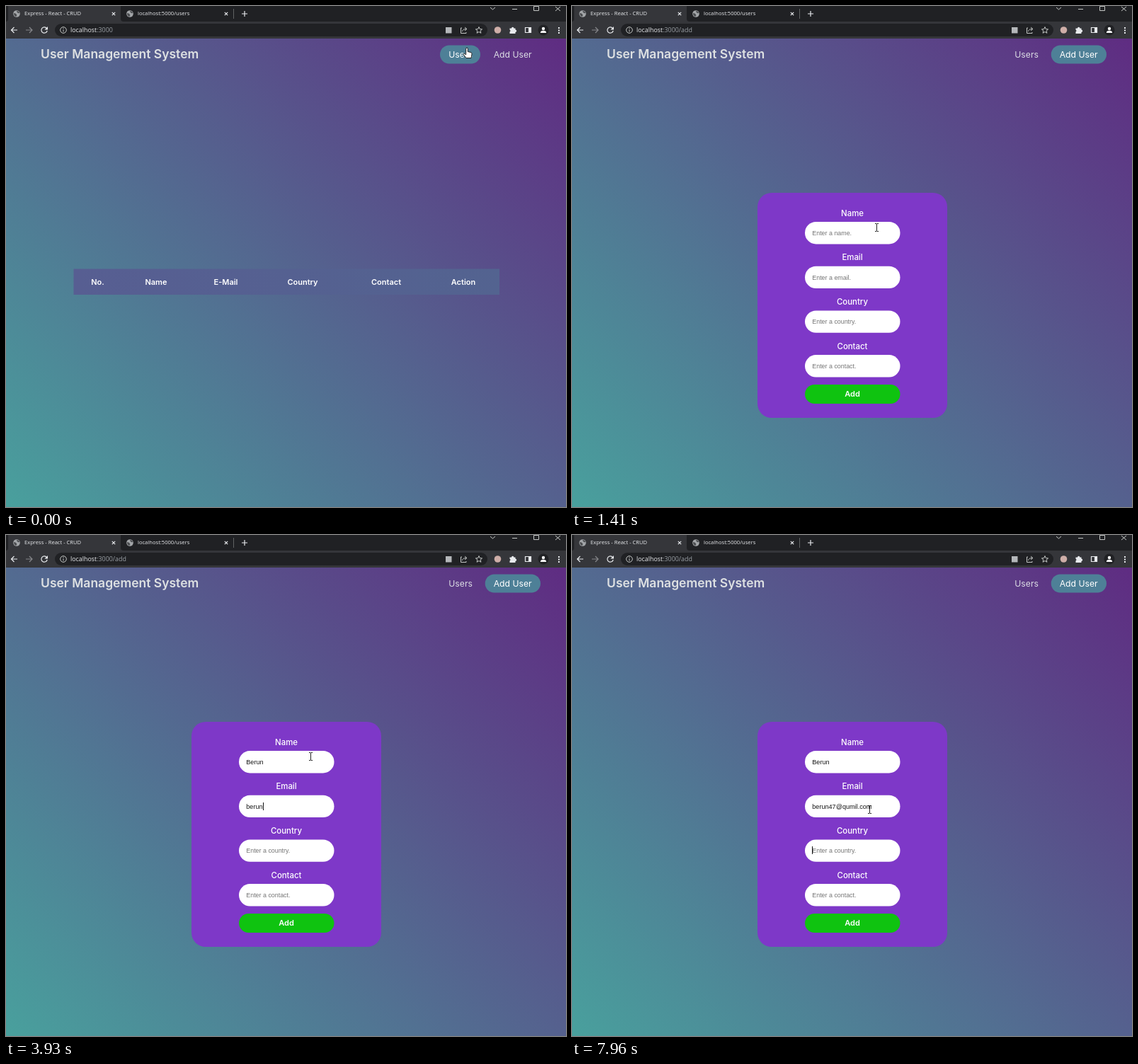
Write an HTML page that moves like this. It is 791 px wide and 708 px high and loops after 8000 ms.

```html
<!DOCTYPE html>
<html lang="en">
<head>
<meta charset="utf-8">
<title>User Management System</title>
<style>
  html, body { margin: 0; width: 100%; height: 100%; overflow: hidden; background: #202124; }
  svg { display: block; width: 100vw; height: 100vh; }
  text { font-family: Inter, "Open Sans", sans-serif; fill: #fff; }
  .tab, .url { font-family: "Open Sans", "Noto Sans", sans-serif; }
  .tab { font-size: 7.6px; fill: #e8eaed; }
  .url { font-size: 8.9px; fill: #e8eaed; }
  .dim { fill: #9aa0a6; }
  .title { font-size: 17.5px; font-weight: 600; fill: #dde0e2; }
  .nav { font-size: 12.2px; fill: #dcdce4; }
  .nav.active { fill: #fff; }
  .mid { text-anchor: middle; }
  .head { font-size: 11px; font-weight: 600; }
  .label { font-size: 11.4px; font-weight: 500; }
  .field { font-family: "Liberation Sans", Arial, sans-serif; font-size: 9.1px; fill: #151515; }
  .field.hint { font-size: 8.9px; fill: #757575; }
  .line { fill: none; stroke: #e8eaed; stroke-width: 1.2; }
  .thin { fill: none; stroke: #c4c7c5; stroke-width: 1; }
</style>
</head>
<body>
<svg viewBox="0 0 791 708" preserveAspectRatio="none">
  <defs>
    <linearGradient id="page" gradientUnits="userSpaceOnUse" x1="32.25" y1="740.25" x2="758.75" y2="13.75">
      <stop stop-color="#49a09d"/><stop offset="1" stop-color="#5f2c82"/>
    </linearGradient>
    <linearGradient id="row">
      <stop stop-color="#575e92"/><stop offset="1" stop-color="#536390"/>
    </linearGradient>
    <g id="globe">
      <circle r="4.8" fill="#a2a5a8"/>
      <path d="M-4-1Q-1-1 0 1T-1 4Q-4 3-4-1M0-4Q0-2 2-1T4-2Q3-4 0-4" fill="#4b4d50"/>
    </g>
    <path id="cross" d="M-2.2-2.2 2.2 2.2M2.2-2.2-2.2 2.2" class="line"/>
  </defs>

  <!-- Browser window -->
  <rect width="791" height="22" fill="#202124"/>
  <path d="M0 22Q3 22 3 18V0H162V18Q162 22 166 22Z" fill="#35363a"/>
  <rect y="22" width="791" height="24" fill="#35363a"/>
  <rect x="69" y="25" width="611" height="18" rx="9" fill="#202124"/>
  <use href="#globe" x="15" y="11"/>
  <use href="#globe" x="175" y="11"/>
  <text class="tab" x="26" y="13.4">Express - React - CRUD</text>
  <text class="tab" x="186" y="13.4">localhost:5000/users</text>
  <use href="#cross" x="152" y="11"/>
  <use href="#cross" x="311" y="11"/>
  <path class="thin" stroke-opacity=".4" d="M321.5 4V18"/>
  <path class="line" d="M333 11H341M337 7V15"/>
  <path class="thin" d="M684 2 687.500 5 691 2M715 4.500H722M745.500 .5H752.500V6.500H745.500ZM776 1 783 7M783 1 776 7"/>
  <path class="line" d="M16 34H7.500M11.500 30 7.500 34 11.500 38"/>
  <path class="line" stroke-opacity=".45" d="M28 34H37M33 30 37 34 33 38"/>
  <path class="line" d="M57.500 31.500A4.200 4.200 0 1 0 58.200 35"/>
  <path d="M59 29V33.500H54.500Z" fill="#e8eaed"/>
  <circle class="thin" cx="81" cy="34" r="4.300"/>
  <path class="thin" d="M81 33.300V36.500M81 31V32.200"/>
  <text class="url" x="91" y="37.2">localhost<tspan class="dim" id="path"></tspan></text>
  <rect x="621" y="30" width="8.500" height="8.500" fill="#b4b7ba"/>
  <path class="thin" d="M644 31H642.500V38.500H650V37M644.500 36Q645 32.500 650 32.500M648 30 651 32.500 648 35"/>
  <path class="thin" d="M668 29.500 669.300 32.600 672.600 32.900 670.100 35 670.900 38.300 668 36.500 665.100 38.300 665.900 35 663.400 32.900 666.700 32.600Z"/>
  <circle cx="694.500" cy="34" r="4.800" fill="#cfaea8"/>
  <path d="M711.500 31.500H714A1.700 1.700 0 0 1 717.400 31.500H719.500V33.500A1.700 1.700 0 0 1 719.500 36.900V39H711.500V36.500A1.500 1.500 0 0 0 711.500 33.700Z" fill="#e8eaed"/>
  <path class="line" d="M733.500 30.500H741.500V37.500H733.500Z"/>
  <rect x="738" y="30" width="4" height="8" fill="#e8eaed"/>
  <circle cx="759" cy="34" r="7.500" fill="#202124"/>
  <path d="M754.800 38Q755 34.800 759 34.800T763.200 38Z" fill="#fff"/>
  <circle cx="759" cy="32" r="2.200" fill="#fff"/>
  <path d="M780 30h2v2h-2zM780 33.500h2v2h-2zM780 37h2v2h-2z" fill="#e8eaed"/>

  <!-- Page -->
  <rect y="46" width="791" height="662" fill="url(#page)"/>
  <text class="title" x="49" y="74">User Management System</text>
  <rect id="pill" y="55.5" height="26" rx="13" fill="#4e8097"/>
  <text class="nav" id="navUsers" x="625.3" y="73">Users</text>
  <text class="nav" id="navAdd" x="688.7" y="73">Add User</text>
  <g id="table"><rect x="95.5" y="371.500" width="601.500" height="36.500" fill="url(#row)"/></g>
  <g id="form">
    <rect x="262" y="264" width="268" height="318" rx="20" fill="#7e38c8"/>
    <rect x="329" y="535" width="134.500" height="27" rx="13.500" fill="#0fc310"/>
    <text class="head mid" x="396" y="552">Add</text>
  </g>
  <rect id="caret" width="1" height="11" fill="#111"/>

  <!-- Pointer -->
  <g id="pointer">
    <circle id="click" r="7.3" fill="#d4b51c" fill-opacity=".85"/>
    <path id="hand" d="M-1.300 1Q-1.300-.5 0-.5T1.300 1V5L6 6.200Q7.200 6.700 7 8.500L6 14H-1L-4.600 9.300Q-5.200 8-3.800 7.700L-1.300 9.300Z" fill="#fff" stroke="#111" stroke-width=".9"/>
    <path id="arrow" d="M0 0V11L2.600 8.700 4.400 12.600 6 11.900 4.300 8H7.800Z" fill="#fff" stroke="#111" stroke-width=".8"/>
    <path id="beam" d="M-2.500-5.500H-.7L0-5 .7-5.500H2.500M0-5V5M-2.500 5.500H-.7L0 5 .7 5.500H2.500" fill="none" stroke="#222" stroke-width="1"/>
  </g>
</svg>
<script>
const LOOP = 8000, PAGE_SWITCH = 700;
const FIELD_X = 339.3, FIELD_TOP = 305, FIELD_STEP = 62.7;
const byId = id => document.getElementById(id);

function add(parent, tag, attributes, content = "") {
  const node = document.createElementNS("http://www.w3.org/2000/svg", tag);
  for (const key in attributes) node.setAttribute(key, attributes[key]);
  node.textContent = content;
  return parent.appendChild(node);
}
function setAll(node, attributes) {
  for (const key in attributes) node.setAttribute(key, attributes[key]);
}
const show = (node, visible) => node.setAttribute("display", visible ? "inline" : "none");

const columns = { "No.": 129.5, "Name": 212, "E-Mail": 310.5, "Country": 419, "Contact": 537, "Action": 646 };
for (const name in columns) {
  add(byId("table"), "text", { class: "head mid", x: columns[name], y: 394 }, name);
}

const fields = ["Name", "Email", "Country", "Contact"].map((label, i) => {
  const top = FIELD_TOP + i * FIELD_STEP, form = byId("form");
  add(form, "text", { class: "label mid", x: 396, y: top - 8.3 }, label);
  add(form, "rect", { x: 329, y: top, width: 134.5, height: 31.4, rx: 15.7, fill: "#fff" });
  const at = { x: FIELD_X, y: top + 18.8 };
  return {
    top,
    hint: add(form, "text", { class: "field hint", ...at }, `Enter a ${label.toLowerCase()}.`),
    value: add(form, "text", { class: "field", ...at })
  };
});

// Keyboard: [time, field, characters typed so far, caret visible]
const keys = [[0, 0, 0, false], [1510, 0, 0, true], [1710, 0, 1, true], [2210, 0, 2, true],
  [2420, 0, 4, true], [2520, 0, 5, true], [2720, 1, 0, true], [3230, 1, 0, false], [3430, 1, 1, true]];
const typeRun = (start, from, to) => {
  for (let n = from; n <= to; n++) keys.push([start + (n - from) * 100, 1, n, true]);
};
typeRun(3630, 2, 5);
keys.push([4340, 1, 6, true], [4640, 1, 7, true], [5040, 1, 8, true], [5540, 1, 8, false]);
typeRun(5640, 9, 13);
typeRun(6250, 14, 17);
keys.push([6860, 2, 0, true], [7460, 2, 0, false], [7960, 2, 0, true]);
const answers = ["Berun", "berun47@qumil.com", "", ""];

// Pointer: [time, shape, x, y, pressed]
const moves = [
  [0, "hand", 651, 59.5], [200, "hand", 658, 60], [300, "hand", 676, 62], [400, "hand", 697, 65],
  [500, "hand", 711, 67], [600, "hand", 713.5, 68, true], [700, "hand", 713.5, 68],
  [810, "arrow", 640, 150], [910, "arrow", 495, 277], [1010, "arrow", 474, 333],
  [1110, "beam", 455, 334], [1310, "beam", 442, 321], [1410, "beam", 430.5, 313],
  [1510, "beam", 430.5, 313, true], [1610, "beam", 430.5, 313],
  [7760, "beam", 429, 326], [7860, "beam", 424, 368], [7960, "beam", 420.5, 388]
];

const latest = (list, time) => list.filter(item => item[0] <= time).pop();

function drawForm(time) {
  const [, active, count, caretOn] = latest(keys, time);
  fields.forEach((field, i) => {
    const text = i < active ? answers[i] : i === active ? answers[i].slice(0, count) : "";
    field.value.textContent = text;
    show(field.hint, !text);
  });
  const { value, top } = fields[active];
  const length = value.textContent ? value.getComputedTextLength() : 0;
  setAll(byId("caret"), { x: Math.round(FIELD_X + length), y: Math.round(top + 10) });
  show(byId("caret"), caretOn);
}

function drawPointer(time) {
  const [, shape, x, y, pressed] = latest(moves, time);
  for (const name of ["hand", "arrow", "beam"]) show(byId(name), name === shape);
  show(byId("click"), pressed);
  setAll(byId("click"), shape === "hand" ? { cx: -1, cy: 1.5, r: 7.3 } : { cx: 0, cy: 0, r: 6.3 });
  byId("pointer").setAttribute("transform", `translate(${x} ${y})`);
}

function draw(now) {
  const time = now % LOOP, adding = time >= PAGE_SWITCH;
  byId("path").textContent = adding ? ":3000/add" : ":3000";
  setAll(byId("pill"), adding ? { x: 676.7, width: 78.3 } : { x: 613, width: 57 });
  byId("navUsers").classList.toggle("active", !adding);
  byId("navAdd").classList.toggle("active", adding);
  show(byId("table"), !adding);
  show(byId("form"), adding);
  drawForm(time);
  drawPointer(time);
}

const start = performance.now();
function tick() {
  draw(performance.now() - start);
  requestAnimationFrame(tick);
}
tick();
</script>
</body>
</html>
```
